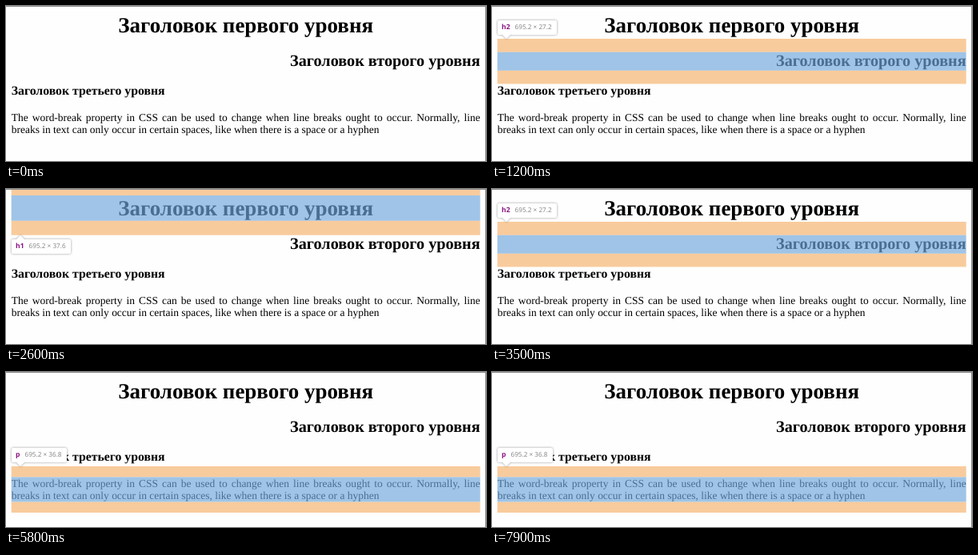
Recreate the animation shown at these times as an HTML page. Size 600 by 194 pixels, loop 8000 ms.

```html
<!DOCTYPE html>
<html lang="ru">
<head>
<meta charset="utf-8">
<style>
html, body { margin: 0; width: 100%; height: 100%; overflow: hidden; background: #fff; }
#stage { position: relative; width: 600px; height: 194px; overflow: hidden; background: #fefefe;
  text-rendering: geometricPrecision; }
#stage > * { position: absolute; margin: 0; box-sizing: border-box; }
#edge { inset: 0; border: solid #8c8c8c; border-width: 1px 1px 0 0; }
h1, h2, h3, p { left: 6.7px; width: 586px; color: #000; font-family: "Liberation Serif", "Times New Roman", serif; }
h1 { top: 9px; font-size: 26.97px; line-height: 31.7px; text-align: center; }
h2 { top: 58px; font-size: 20.23px; line-height: 22.9px; text-align: right; }
h3 { top: 97.5px; font-size: 15.78px; line-height: 18.2px; }
p { top: 131.5px; font-size: 13.49px; line-height: 15.5px; text-align: justify; }
#overlay { left: 0; top: 0; }
#margin { fill: rgba(246, 178, 107, .66); }
#content { fill: rgba(111, 168, 220, .66); }
#tip { display: flex; align-items: baseline; gap: 6px; height: 18px; padding: 0 6px 0 5.5px; border-radius: 2px;
  background: #fff; white-space: nowrap; font: 8.2px/17px "Open Sans", "Noto Sans", sans-serif; color: #808080;
  filter: drop-shadow(0 0 1.5px rgba(0, 0, 0, .4)); }
#tip b { color: #881280; font-size: 8.6px; }
#tip i { position: absolute; left: 6px; border: solid transparent; border-width: 0 5.5px; }
#tip.above i { top: 100%; border-top: 5px solid #fff; }
#tip.below i { bottom: 100%; border-bottom: 5px solid #fff; }
</style>
</head>
<body>
<div id="stage">
  <h1>Заголовок первого уровня</h1>
  <h2>Заголовок второго уровня</h2>
  <h3>Заголовок третьего уровня</h3>
  <p>The word-break property in CSS can be used to change when line breaks ought to occur. Normally, line breaks in text can only occur in certain spaces, like when there is a space or a hyphen</p>
  <svg id="overlay" width="600" height="194"><path id="margin"/><path id="content"/></svg>
  <div id="edge"></div>
  <div id="tip"><b></b><span></span><i></i></div>
</div>
<script>
// y and h: content box; m: margin above and below; tip: tooltip top
const targets = {
  h1: { size: '695.2 × 37.6', y: 8, h: 31.7, m: 18.1, tip: 63 },
  h2: { size: '695.2 × 27.2', y: 57.8, h: 22.9, m: 16.8, tip: 17.5 },
  h3: { size: '695.2 × 21.6', y: 97.5, h: 18.2, m: 15.8, tip: 58 },
  p: { size: '695.2 × 36.8', y: 131.5, h: 31, m: 13.5, tip: 95 },
  '#text': { size: '871 × 46', y: 131.5, h: 31, m: 0, tip: 108.5 }
};
const timeline = [
  [0, null], [400, 'p'], [700, 'h3'], [1000, 'h2'], [1700, 'h1'], [2800, 'h2'],
  [4200, 'h3'], [5800, 'p'], [6200, '#text'], [7400, 'p']
];
const LOOP = 8000;
const [overlay, margin, content, tip] =
  ['overlay', 'margin', 'content', 'tip'].map(id => document.getElementById(id));
let shown;

const band = (y, h) => `M6.7 ${y}h586v${h}h-586z`;

function inspect(name) {
  if (name === shown) return;
  shown = name;
  overlay.style.display = name ? 'block' : 'none';
  tip.style.display = name ? 'flex' : 'none';
  if (!name) return;
  const { size, y, h, m, tip: top } = targets[name];
  margin.setAttribute('d', band(y - m, m) + band(y + h, m));
  content.setAttribute('d', band(y, h));
  tip.style.top = top + 'px';
  tip.style.left = name === '#text' ? '5px' : '6.5px';
  tip.className = top < y ? 'above' : 'below';
  tip.children[0].textContent = name;
  tip.children[1].textContent = size;
}

const start = performance.now();
function frame() {
  const t = (performance.now() - start) % LOOP;
  inspect(timeline.findLast(([from]) => from <= t)[1]);
  requestAnimationFrame(frame);
}
frame();
</script>
</body>
</html>
```
